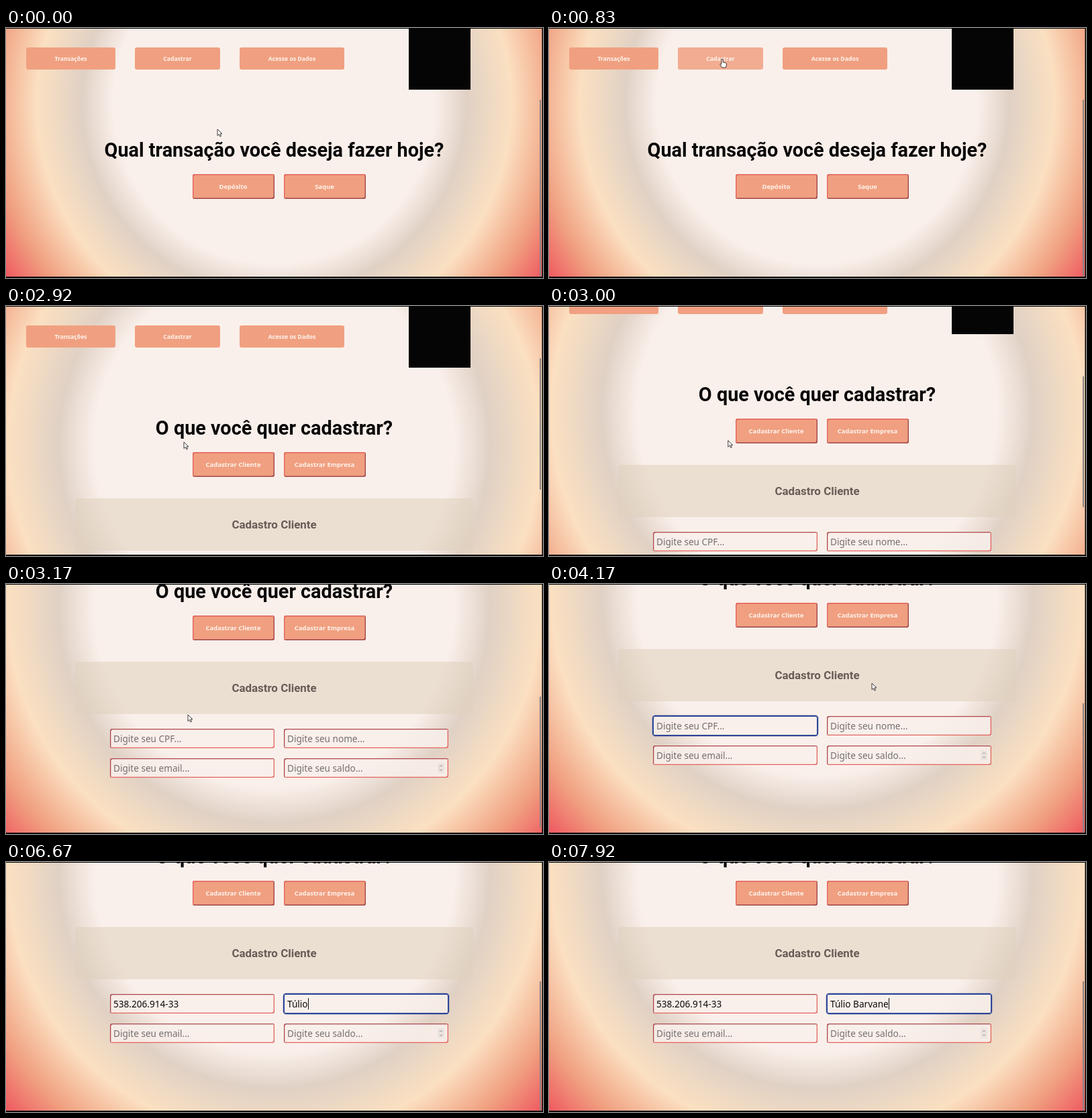
An HTML page that plays this animation: 800x373 px, repeating every 8 s.

```html
<!DOCTYPE html>
<html lang="pt">
<head>
<meta charset="utf-8">
<title>Cadastro</title>
<style>
  html, body { margin: 0; width: 100%; height: 100%; overflow: hidden; background: #000; }
  #stage { position: relative; width: 800px; height: 373px; overflow: hidden; background: #050505; }
  #view { position: absolute; inset: 0; clip-path: inset(1px 1.5px 2px 0); }
  #page, #page > *, #thumb, #cursor { position: absolute; }
  #page { left: 0; top: 0; width: 800px; height: 0; }
  #bg {
    left: 0; top: -150px; width: 799px;
    background: radial-gradient(circle, #faf0eb 50%, #e0d1c5 60%, #fbe0c1 74%, #f0a080 88%, #ef5760 100%);
  }
  #mark { left: 600px; top: 0; width: 92px; height: 92px; background: #050505; }
  h1, h2 {
    margin: 0; white-space: nowrap; text-align: center;
    font-family: Roboto, "Open Sans", sans-serif; font-weight: 600;
  }
  h1 { left: 0; top: 162px; width: 799px; font-size: 28.8px; line-height: 40px; color: #090707; }
  h2 {
    left: 103px; top: 287px; width: 593px; height: 77.5px; border-radius: 3px;
    background: rgba(224, 209, 190, .55); color: #675c56; font-size: 16.9px; line-height: 78px;
  }
  .btn, .nav {
    display: flex; align-items: center; justify-content: center; white-space: nowrap;
    border-radius: 3px; background: #f0a080; color: #fdf3ed;
    font: 700 9.45px "Noto Sans", "Open Sans", sans-serif;
  }
  .nav { top: 29px; height: 33px; font-size: 8.7px; }
  .btn {
    top: 217.5px; width: 122px; height: 37.5px;
    box-shadow: inset 1.4px 1.4px #e2645e, inset -1.4px -1.4px #a0474a;
  }
  .hover { opacity: .84; }
  .field {
    display: flex; align-items: center; box-sizing: border-box; padding-left: 5px;
    width: 244.5px; height: 29px; border-radius: 3px; white-space: pre;
    background: rgba(250, 240, 235, .85); color: #757070;
    box-shadow: inset 1.3px 1.3px #ad464b, inset -1.3px -1.3px #e2645e;
    font: 13.6px "Noto Sans", "Open Sans", sans-serif;
  }
  .filled { color: #0c0a0a; }
  .focus { box-shadow: inset 0 0 0 1px #2c4597, 0 0 0 1.2px #2c4597; }
  .caret::after { content: ""; width: 1px; height: 17px; background: #111; }
  #spin { left: 643px; top: 437.5px; }
  #thumb { left: 795.3px; width: 2.2px; background: #8a8483; }
  #cursor { left: 0; top: 0; overflow: visible; }
</style>
</head>
<body>
<div id="stage">
  <div id="view">
    <div id="page">
      <div id="bg"></div>
      <div id="mark"></div>
      <div class="nav" style="left:30px;width:133px">Transações</div>
      <div class="nav" id="navAdd" style="left:192px;width:127px">Cadastrar</div>
      <div class="nav" style="left:348px;width:156px">Acesse os Dados</div>
      <h1 id="title"></h1>
      <div class="btn" id="first" style="left:277.5px"></div>
      <div class="btn" id="second" style="left:413.5px"></div>
      <h2 class="form">Cadastro Cliente</h2>
      <div class="form field" id="cpf" style="left:155px;top:387px"></div>
      <div class="form field" id="person" style="left:414px;top:387px"></div>
      <div class="form field" style="left:155px;top:430.5px">Digite seu email...</div>
      <div class="form field" style="left:414px;top:430.5px">Digite seu saldo...</div>
      <svg class="form" id="spin" width="10" height="15">
        <rect width="10" height="15" rx="1.5" fill="#ebe4e0"/>
        <path d="M3 5.5l2-2 2 2M3 9.5l2 2 2-2" fill="none" stroke="#8a8380" stroke-width="1"/>
      </svg>
    </div>
    <div id="thumb"></div>
    <svg id="cursor" width="12" height="18" stroke="#2b2727" stroke-width=".9" stroke-linejoin="round">
      <path id="arrow" fill="#fff" d="M0 0V9.6L2.3 7.5 3.9 11 5.5 10.3 4 6.9H7Z"/>
      <path id="hand" fill="#fff" d="M-1.1 1Q0-.8 1.1 1V5L5.2 6Q6.6 6.4 6.5 8L5.6 13H-.2L-3.2 8.6Q-3.6 7-1.1 8.2Z"/>
      <path id="beam" fill="none" d="M-2-5.5H2M0-5.5V5.5M-2 5.5H2"/>
    </svg>
  </div>
</div>
<script>
const LOOP = 8000, FRAME = 1000 / 12, VIEW = 373;
const CPF = "538.206.914-33", PERSON = "Túlio Barvane";

// [ms, x, y]
const pointer = [
  [0, 315, 151], [160, 315, 151], [750, 258, 46], [1080, 258, 46], [1830, 328, 234.5],
  [2330, 328, 234.5], [2750, 265, 203], [2910, 265, 203], [3160, 271, 195], [3330, 271, 195],
  [3670, 300, 212], [3850, 300, 212], [4160, 481, 148], [5080, 481, 148],
  [5280, 575, 212], [5360, 575, 212], [5500, 627, 188], [5700, 640, 180]
];
// [ms, offset]
const scroll = [[2920, 0], [3000, 50], [3080, 125], [3160, 170], [3330, 190]];

const $ = id => document.getElementById(id);
const forms = document.querySelectorAll(".form");
const show = (el, on) => { el.style.visibility = on ? "visible" : "hidden"; };

function sample(keys, t, ease = k => k) {
  if (t <= keys[0][0]) return keys[0].slice(1);
  for (let i = 1; i < keys.length; i++) {
    const a = keys[i - 1], b = keys[i];
    if (t < b[0]) {
      const k = ease((t - a[0]) / (b[0] - a[0]));
      return a.slice(1).map((v, j) => v + (b[j + 1] - v) * k);
    }
  }
  return keys[keys.length - 1].slice(1);
}
const smooth = k => k * k * (3 - 2 * k);

function typed(text, t, start, pace) {
  return text.slice(0, Math.max(0, Math.floor((t - start) / pace)));
}

function fill(el, value, hint, focused) {
  el.textContent = value || hint;
  el.classList.toggle("filled", !!value);
  el.classList.toggle("focus", focused);
  el.classList.toggle("caret", focused && !!value);
}

function draw(t) {
  const adding = t >= 960, open = t >= 2300;
  const height = open ? 713 : 524;
  const y = Math.round(sample(scroll, t)[0]);
  $("page").style.transform = `translateY(${-y}px)`;
  $("bg").style.height = height + "px";
  $("thumb").style.top = (y + 150) / height * VIEW + "px";
  $("thumb").style.height = VIEW * VIEW / height + "px";

  $("title").textContent = adding ? "O que você quer cadastrar?" : "Qual transação você deseja fazer hoje?";
  $("first").textContent = adding ? "Cadastrar Cliente" : "Depósito";
  $("second").textContent = adding ? "Cadastrar Empresa" : "Saque";
  forms.forEach(el => show(el, open));
  fill($("cpf"), typed(CPF, t, 4350, 50), "Digite seu CPF...", t >= 3740 && t < 5300);
  fill($("person"), typed(PERSON, t, 5900, 150), "Digite seu nome...", t >= 5300);

  const [px, py] = sample(pointer, t, smooth);
  const inside = (x, top, w, h) => px >= x && px <= x + w && py >= top && py <= top + h;
  const onNav = !open && inside(192, 29, 127, 33);
  const onFirst = inside(277, 218 - y, 122, 37);
  const onField = open && (inside(155, 387 - y, 244, 29) || inside(414, 387 - y, 244, 29)) && t > 3330 && py > 200;
  const visible = !(t > 4390 && t < 5070) && t < 6000;
  $("navAdd").classList.toggle("hover", onNav);
  $("first").classList.toggle("hover", onFirst);
  $("cursor").style.transform = `translate(${px}px,${py}px)`;
  show($("arrow"), visible && !onNav && !onFirst && !onField);
  show($("hand"), visible && (onNav || onFirst));
  show($("beam"), visible && onField);
}

let last = -1;
const begin = performance.now();
function tick() {
  const t = (performance.now() - begin) % LOOP;
  const step = Math.floor((t + 5) / FRAME) % 96;
  if (step !== last) draw((last = step) * FRAME);
  requestAnimationFrame(tick);
}
tick();
</script>
</body>
</html>
```
